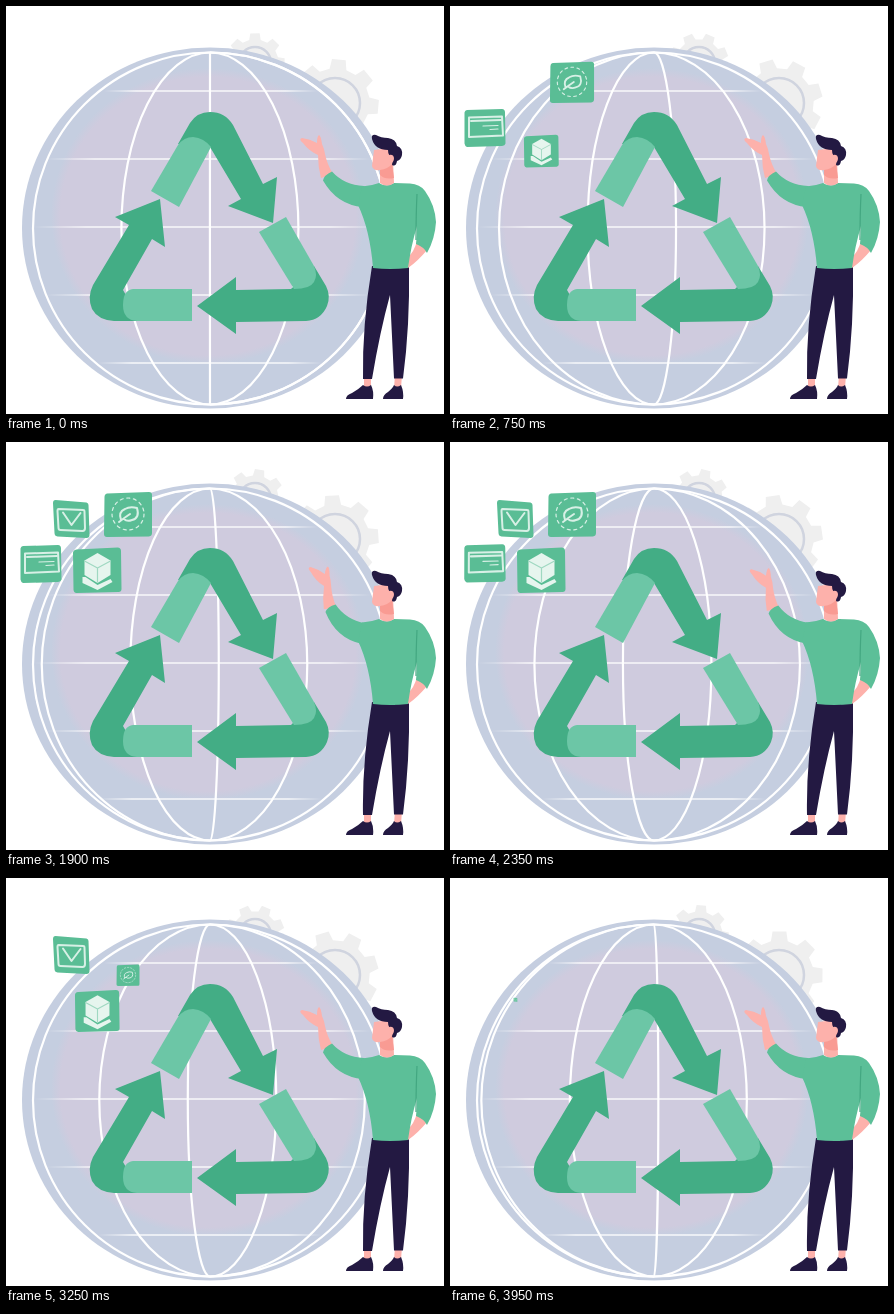
An HTML page for the animation above (4 s loop, 438 px wide and 408 px high).

```html
<!DOCTYPE html>
<html lang="en">
<head>
<meta charset="utf-8">
<title>Recycling globe</title>
<style>
  html, body { margin: 0; width: 100%; height: 100%; overflow: hidden; background: #fff; }
  svg { display: block; width: 438px; height: 408px; }
  .line { fill: none; stroke: #fff; stroke-width: 2.2; }
  .gear { fill: #efefef; }
  .hub { fill: none; stroke: #d0d4df; stroke-width: 2.5; }
  .dark { fill: #43ad85; }
  .light { fill: #6cc6a6; }
  .skin { fill: #fdb1ab; }
  .shade { fill: #f99b93; }
  .navy { fill: #231942; }
  .knit { fill: #5cbf98; }
  .tile { fill: #5abd95; }
  .mark { fill: none; stroke: #d8f0e6; stroke-width: 2; stroke-linejoin: round; stroke-linecap: round; }
  .thin { stroke-width: 1.2; }
  .pale { fill: #e6f5ee; }
</style>
</head>
<body>
<svg viewBox="0 0 438 408">
  <defs>
    <radialGradient id="glow">
      <stop offset=".94" stop-color="#cfcbde"/>
      <stop offset="1" stop-color="#cfcbde" stop-opacity="0"/>
    </radialGradient>
    <linearGradient id="fade">
      <stop offset="0" stop-color="#fff" stop-opacity="0"/>
      <stop offset=".15" stop-color="#fff" stop-opacity=".65"/>
      <stop offset=".85" stop-color="#fff" stop-opacity=".65"/>
      <stop offset="1" stop-color="#fff" stop-opacity="0"/>
    </linearGradient>
  </defs>

  <g id="gears"></g>

  <ellipse cx="204" cy="222" rx="188" ry="180.5" fill="#c5cee0"/>
  <ellipse cx="202" cy="210" rx="157" ry="148" fill="url(#glow)"/>
  <g id="parallels" fill="url(#fade)"></g>
  <ellipse class="line" cx="204" cy="222.5" rx="177" ry="176"/>
  <g id="meridians" class="line"></g>

  <g id="arrows">
    <path class="dark" d="M172 138L184 117Q191 106 204 106Q219 106 227 119L257 178L271 171L267 217L222 200L235 193L204 141Z"/>
    <path class="light" d="M145 185L172 139Q178 131 187 131Q198 132 205 141L173 201Z"/>
    <path class="dark" d="M308 260L320 280Q325 290 321 300Q315 314 300 315L230 316V328L191 300L230 271V284L285 283Z"/>
    <path class="light" d="M253 226L280 211L308 260Q312 269 308 276Q304 283 288 283Z"/>
    <path class="dark" d="M154 193L159 241L146 233L117 284L135 315H108Q92 314 86 303Q81 291 87 279L123 219L109 211Z"/>
    <path class="light" d="M186 283V315H131Q117 314 117 299Q117 284 127 283Z"/>
  </g>

  <g id="icons">
    <g id="card">
      <path class="tile" d="M-18 -17.5L17 -18.5Q20 -18.5 20 -15L20.500 16Q20 18 17 18.500L-18 19.500Q-20 19 -20.500 16L-20.500 -15Q-20 -17.500 -18 -17.500Z"/>
      <path class="mark" d="M-16 -10L17 -11L18 8L-16 9.500Z"/>
      <path class="mark" d="M-14 -6.500L16 -7.500"/>
      <path class="mark thin" d="M-2 -1.500L13 -2M5 2L13 1.500"/>
    </g>
    <g id="leaf">
      <path class="tile" d="M-21 -21.500L21 -23Q24 -23 24 -20V18Q24 21 21 21.500L-21 22Q-24 22 -24 19L-23.500 -18Q-23.500 -21 -21 -21.500Z"/>
      <circle class="mark thin" cy="-1" r="16" stroke-dasharray="3 3.700"/>
      <path class="mark" d="M-7 5Q-10 -3 -3 -6Q2 -9 9 -7Q12 3 4 5Q-1 7 -4 4M-9 7Q-4 3 2 -1" stroke-width="1.700"/>
    </g>
    <g id="box">
      <path class="tile" d="M-21 -20.500L20 -22.500Q23.500 -22.500 23.500 -19L24 19Q24 22 21 22L-21 23Q-23.500 23 -24 20L-24.500 -17Q-24.500 -20 -21 -20.500Z"/>
      <path class="pale" d="M0 -17L13 -9.500V5L0 13L-13 5V-9.500Z"/>
      <path class="mark thin" d="M-13 -9L0 -2L13 -9M0 -2V12" style="stroke:#9fd8c1"/>
      <path class="pale" d="M-15 7L-12 7L0 15L13 9L15 12L0 20L-15 13Z"/>
    </g>
    <g id="letter">
      <path class="tile" d="M-16 -19L15 -16.500Q17 -16 17 -14L18 16Q18 19 15 19L-14 17.500Q-17 17 -17 14L-18.500 -16Q-18.500 -19 -16 -19Z"/>
      <path class="mark" d="M-13 -10L12 -9Q13 -9 13 -7L13.500 9Q13.500 12 11 12L-11 11Q-13 11 -13 9L-14 -8Q-14 -10 -13 -10Z"/>
      <path class="mark" d="M-8.500 -6.500L0 6L9 -6"/>
    </g>
  </g>

  <g id="man">
    <path class="skin" d="M358 369H365L365 382H358ZM389 369H396L395 382H388Z"/>
    <path class="navy" d="M340 393Q340 389 346 387Q353 383 357 379Q361 382 365 379Q368 385 367 393ZM377 393Q377 389 382 386Q387 382 388 379Q391 382 395 379Q398 386 397 393Z"/>
    <path class="navy" d="M366 260H403Q404 320 397 372.500H388Q386 330 384 289Q374 325 366 373H357Q356 320 366 260Z"/>
    <path class="skin" d="M411 235L421 244Q412 255 402 262L402 251Q408 246 411 235Z"/>
    <g id="arm">
      <path class="skin" d="M327 168Q321 158 319 148Q318 142 316 138Q315 130 313 129Q311 130 311 137Q304 133 296 132Q292 133 297 137Q303 145 312 149Q312 161 315 172Z"/>
      <path class="knit" d="M317 174.500Q318 169 326 165.500Q338 179 358 180L373 194L357 201Q331 199 317 174.500Z"/>
    </g>
    <path class="knit" d="M356 180.500Q365 180 373 177Q381 182 388 177L404 177.500Q414 178 419 185Q429 199 430 216Q429 233 421 247Q418 241 410 238Q411 230 411 220Q405 240 402 262Q384 264 367 262Q364 224 352 199Z"/>
    <path d="M411 188Q410 208 410 234" fill="none" stroke="#43a781" stroke-width="1.200"/>
    <path class="skin" d="M368 144L366 160Q367 165 374 164V177Q381 182 388 177L387 154L384 142Z"/>
    <path class="shade" d="M374 164Q382 163 386 158L388 172Q379 174 374 169Z"/>
    <path class="navy" d="M366 133Q365 128 370 129Q375 132 382 132Q390 133 391 140Q397 142 396 149Q395 154 391 155Q390 161 386 159L387 151Q382 151 382 144Q369 144 366 133Z"/>
    <path class="skin" d="M383 149Q388 148 388 153Q387 158 384 157Z"/>
  </g>
</svg>

<script>
const LOOP = 4000;
const $ = id => document.getElementById(id);

function add(parent, tag, attrs) {
  const el = document.createElementNS("http://www.w3.org/2000/svg", tag);
  for (const key in attrs) el.setAttribute(key, attrs[key]);
  return parent.appendChild(el);
}

// Eight-toothed wheel around the origin
function gearPath(r) {
  const points = [];
  for (let i = 0; i < 8; i++) {
    for (const [deg, k] of [[-14, .79], [-9, 1], [9, 1], [14, .79]]) {
      const a = (i * 45 + deg) * Math.PI / 180;
      points.push((r * k * Math.cos(a)).toFixed(2) + " " + (r * k * Math.sin(a)).toFixed(2));
    }
  }
  return "M" + points.join("L") + "Z";
}

const gears = [
  { x: 249, y: 57, r: 30, hub: 16, speed: -90, start: 0 },
  { x: 329, y: 97, r: 44, hub: 25, speed: 90, start: 5 }
].map(g => {
  g.el = add($("gears"), "path", { class: "gear", d: gearPath(g.r) });
  add($("gears"), "circle", { class: "hub", cx: g.x, cy: g.y, r: g.hub });
  return g;
});

for (const [y, x1, x2] of [[85, 98, 312], [153, 40, 365], [221, 28, 376], [289, 40, 365], [357, 92, 316]])
  add($("parallels"), "rect", { x: x1, y: y - 1, width: x2 - x1, height: 2 });

const meridians = [0, 1, 2, 3].map(() => add($("meridians"), "path", {}));

// Linear interpolation over [time, value] pairs, with optional easing
function track(keys, t, ease = u => u) {
  if (t <= keys[0][0]) return keys[0][1];
  for (let i = 1; i < keys.length; i++) {
    const [t0, a] = keys[i - 1], [t1, b] = keys[i];
    if (t < t1) return a + (b - a) * ease((t - t0) / (t1 - t0));
  }
  return keys[keys.length - 1][1];
}
const smooth = u => u * u * (3 - 2 * u);

const bounce = [[0, 0], [30, .13], [60, .43], [85, .73], [125, 1.08], [165, 1.24], [200, 1.28],
  [250, 1.24], [320, 1.04], [360, .95], [405, .91], [450, .94], [520, 1.01], [580, 1.03], [660, 1]];
const wave = [[0, 0], [750, 0], [1250, -14], [1900, 8], [2800, 2.5], [3250, 0], [4000, 0]];

// base: the point below each tile that it grows from
const icons = [
  { id: "card", x: 35, y: 121.5, base: 175, from: 0, to: 2985, tilt: 20 },
  { id: "leaf", x: 122, y: 73, base: 120, from: 333, to: 3315, tilt: 0 },
  { id: "box", x: 91.5, y: 128, base: 188, from: 667, to: 3645, tilt: 0 },
  { id: "letter", x: 65.5, y: 77, base: 127, from: 1000, to: 3975, tilt: 0 }
];

function draw(t) {
  for (const g of gears)
    g.el.setAttribute("transform", `translate(${g.x} ${g.y}) rotate(${g.start + g.speed * t / 1000})`);

  const shift = 1 - t % 1000 / 1000;
  meridians.forEach((el, i) => {
    const dx = (i + shift - 2) * 88.5;
    el.setAttribute("d", `M204 46.500A${Math.abs(dx)} 176 0 0 ${dx > 0 ? 1 : 0} 204 398.500`);
  });

  for (const n of icons) {
    const s = track(bounce, Math.min(t - n.from, n.to - t));
    const y = n.base + (n.y - n.base) * s;
    $(n.id).setAttribute("transform",
      `translate(${n.x} ${y}) rotate(${(s > 1 ? s - 1 : 0) * n.tilt}) scale(${s})`);
  }

  $("arm").setAttribute("transform", `rotate(${track(wave, t, smooth)} 350 190)`);
}

const start = performance.now();
function tick() {
  draw((performance.now() - start) % LOOP);
  requestAnimationFrame(tick);
}
draw(0);
tick();
</script>
</body>
</html>
```
